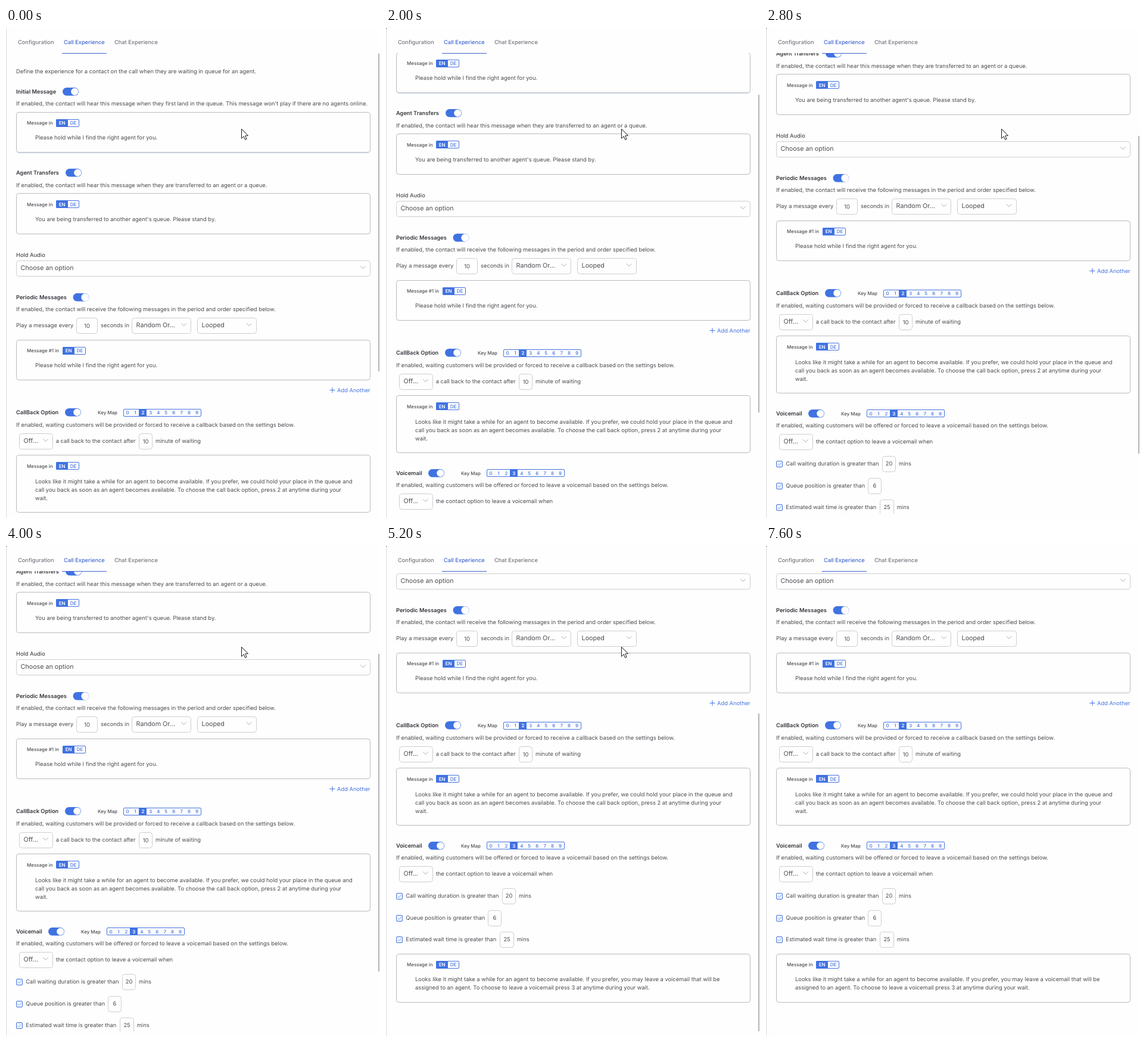
An HTML page for the animation above (8200 ms loop, 628 px wide and 822 px high).

```html
<!DOCTYPE html>
<html lang="en">
<head>
<meta charset="utf-8">
<title>Call Experience settings</title>
<style>
  html, body { margin: 0; width: 100%; height: 100%; overflow: hidden; background: #fefefe; }
  svg { display: block; width: 628px; height: 822px; }
  text {
    font-family: Inter, "Open Sans", sans-serif;
    font-size: 9.35px;
    fill: #4b4c52;
    text-rendering: geometricPrecision;
  }
  .title { font-weight: 600; font-size: 9.26px; fill: #34353b; }
  .label { font-weight: 500; font-size: 9.26px; }
  .small { font-weight: 500; font-size: 7.95px; }
  .pick { font-size: 10.7px; }
  .tab { font-weight: 500; font-size: 9.26px; fill: #74757e; }
  .active { fill: #4067d2; }
  .link { fill: #4473de; }
  .key { font-weight: 500; font-size: 7.95px; fill: #4473de; }
  .on { font-weight: 600; font-size: 7.95px; fill: #fff; }
  .mid { text-anchor: middle; }
  .card { fill: #fefefe; stroke: #b9babd; }
  .field { fill: #fefefe; stroke: #cdced2; }
  .chev { fill: none; stroke: #a3a4aa; stroke-width: .9; }
  .outline { fill: #fefefe; stroke: #4473de; }
  .blue { fill: #4072e2; }
</style>
</head>
<body>
<svg viewBox="0 0 628 822">
  <defs><clipPath id="view"><rect x="0" y="42" width="628" height="773"/></clipPath></defs>
  <rect width="628" height="822" fill="#fefefe"/>
  <g clip-path="url(#view)"><g id="page"></g></g>
  <g id="tabs"></g>
  <rect x="0" y="0" width="1" height="822" fill="#dcdcdf"/>
  <rect id="thumb" x="625" y="0" width="2" height="533" fill="#b4b5b8"/>
  <rect id="dot" width="1" height="1" fill="#000"/>
  <path id="cursor" d="M.5 .5V16.3L4.2 12.8 6.6 18.4 9.1 17.3 6.7 11.8 11.5 11.6Z"
        fill="#fff" stroke="#1c1c1e" stroke-linejoin="round"/>
</svg>
<script>
const $ = id => document.getElementById(id);
const page = $('page');
let root = page;

function add(tag, attrs, content) {
  const el = document.createElementNS('http://www.w3.org/2000/svg', tag);
  for (const k in attrs) el.setAttribute(k, attrs[k]);
  if (content) el.textContent = content;
  root.appendChild(el);
  return el;
}

// y is the baseline
function text(x, y, str, cls = '') {
  return add('text', { x, y, class: cls }, str);
}

function box(x, y, x2, y2, cls, rx = 4) {
  return add('rect', { x: x + .5, y: y + .5, width: x2 - x - 1, height: y2 - y - 1, rx, class: cls });
}

function chevron(x, y) {
  add('path', { d: `M${x - 4.3} ${y - 2}l4.3 4.2 4.3-4.2`, class: 'chev' });
}

function select(x, y, x2, str, arrow) {
  box(x, y, x2, y + 27, 'field');
  text(x + 7.6, y + 16, str, 'pick');
  chevron(arrow, y + 11.4);
}

function number(x, y, x2, str, drop = 17) {
  box(x, y, x2, y + 27, 'field');
  text((x + x2) / 2, y + drop, str, 'mid');
}

function toggle(x, y, knob) {
  add('rect', { x, y: y - 6.7, width: 27, height: 13.4, rx: 6.7, class: 'blue' });
  add('circle', { cx: x + 20.3, cy: y, r: knob, fill: '#fefefe' });
}

function languages(x, top, base) {
  box(x, top, x + 39, top + 13, 'outline', 1.5);
  add('rect', { x, y: top, width: 20, height: 13, rx: 1.5, class: 'blue' });
  text(x + 10.2, base, 'EN', 'on mid');
  text(x + 29, base, 'DE', 'key mid');
}

function message(top, bottom, name, langX, nameY, textY, lines) {
  box(17, top, 612, bottom, 'card');
  text(35, nameY, name, 'small');
  languages(langX, top + 12, nameY);
  lines.forEach((s, i) => text(49, textY + 14 * i, s));
}

function keyMap(x, top, base, picked) {
  text(x, base, 'Key Map', 'small');
  const left = x + 43;
  box(left, top, left + 131, top + 13, 'outline', 1.5);
  for (let i = 0; i < 10; i++) {
    const mid = left + 7 + 12.95 * i;
    if (i === picked) add('rect', { x: Math.round(mid - 6.6), y: top, width: 13, height: 13, class: 'blue' });
    text(mid, base, String(i), (i === picked ? 'on' : 'key') + ' mid');
  }
}

function section(y, title, toggleX, noteY, note, knob = 6.1) {
  text(17, y, title, 'title');
  toggle(toggleX, y - 3.2, knob);
  text(17, noteY, note);
}

function condition(y, str, x, x2, value, unitX) {
  add('rect', { x: 17.5, y: y - 7.5, width: 10, height: 10, rx: 1.5, fill: '#edf3fd', stroke: '#4473de' });
  add('path', { d: `M19.6 ${y - 2.5}l2.2 2.2 4-4.6`, fill: 'none', stroke: '#86a8ea' });
  text(33.3, y, str);
  number(x, y - 16, x2, value, 16);
  if (unitX) text(unitX, y, 'mins');
}

// Scrolling page
text(17, 76, 'Define the experience for a contact on the call when they are waiting in queue for an agent.');

section(110, 'Initial Message', 95, 130,
  "If enabled, the contact will hear this message when they first land in the queue. This message won't play if there are no agents online.");
add('rect', { x: 18, y: 143, width: 593, height: 67.5, rx: 4, fill: '#dde6f3' });
message(141, 209, 'Message in', 84, 162, 187, ['Please hold while I find the right agent for you.']);

section(246, 'Agent Transfers', 100, 267,
  'If enabled, the contact will hear this message when they are transferred to an agent or a queue.');
message(277, 346, 'Message in', 84, 299, 324, ["You are being transferred to another agent's queue. Please stand by."]);

text(17, 384, 'Hold Audio', 'label');
select(17, 390, 612, 'Choose an option', 599.5);

section(455, 'Periodic Messages', 112.5, 475,
  'If enabled, the contact will receive the following messages in the period and order specified below.', 6.5);
text(17, 502, 'Play a message every');
number(118, 486, 154, '10');
text(159, 502, 'seconds in');
select(211, 486, 311, 'Random Or...', 298.7);
select(321, 486, 421, 'Looped', 408);
message(523, 591, 'Message #1 in', 95, 544, 569, ['Please hold while I find the right agent for you.']);
add('path', { d: 'M543.5 607.5h9M548 603v9', stroke: '#4473de', fill: 'none' });
text(556, 611, 'Add Another', 'link');

section(648, 'CallBack Option', 99, 669,
  'If enabled, waiting customers will be provided or forced to receive a callback based on the settings below.');
keyMap(154, 639, 648, 2);
select(22, 680, 79, 'Off...', 66.5);
text(83.7, 696, 'a call back to the contact after');
number(223, 680, 246, '10');
text(251, 696, 'minute of waiting');
message(716, 813, 'Message in', 84, 738, 764, [
  'Looks like it might take a while for an agent to become available. If you prefer, we could hold your place in the queue and',
  'call you back as soon as an agent becomes available. To choose the call back option, press 2 at anytime during your',
  'wait.'
]);

section(850, 'Voicemail', 71, 870,
  'If enabled, waiting customers will be offered or forced to leave a voicemail based on the settings below.');
keyMap(126, 840, 850, 3);
select(22, 881, 79, 'Off...', 66.5);
text(83.7, 897, 'the contact option to leave a voicemail when');
condition(934, 'Call waiting duration is greater than', 195, 218, '20', 223);
condition(971, 'Queue position is greater than', 171, 194, '6');
condition(1007, 'Estimated wait time is greater than', 191, 215, '25', 219.7);
message(1028, 1110, 'Message in', 84, 1049, 1074, [
  'Looks like it might take a while for an agent to become available. If you prefer, you may leave a voicemail that will be',
  'assigned to an agent. To choose to leave a voicemail press 3 at anytime during your wait.'
]);

// Fixed tabs
root = $('tabs');
text(20, 27, 'Configuration', 'tab');
text(97, 27, 'Call Experience', 'tab active');
text(182, 27, 'Chat Experience', 'tab');
add('rect', { x: 94, y: 42, width: 75, height: 1, fill: '#4064d0' });

// Stepped motion
const LOOP = 8200;
function play(el, prop, steps) {
  const frames = steps.map(([t, v]) => ({ offset: t / LOOP, [prop]: v, easing: 'step-end' }));
  frames.push({ offset: 1, [prop]: steps[steps.length - 1][1] });
  el.animate(frames, { duration: LOOP, iterations: Infinity });
}
const move = (x, y) => `translate(${x}px, ${y}px)`;
const scroll = [[0, 0], [2000, 100], [2800, 200], [4200, 300], [5200, 344]];

play(page, 'transform', scroll.map(([t, s]) => [t, move(0, -s)]));
play($('thumb'), 'transform', scroll.map(([t, s]) => [t, move(0, 43 + Math.round(s * .692))]));
play($('thumb'), 'opacity', [[0, 1], [6400, 0], [7400, 1], [7600, 0]]);
play($('cursor'), 'transform', [[0, move(395, 169)], [7200, move(333, 148)]]);
play($('cursor'), 'opacity', [[0, 1], [7400, 0]]);
play($('dot'), 'opacity', [[0, 0], [800, 1]]);
</script>
</body>
</html>
```
